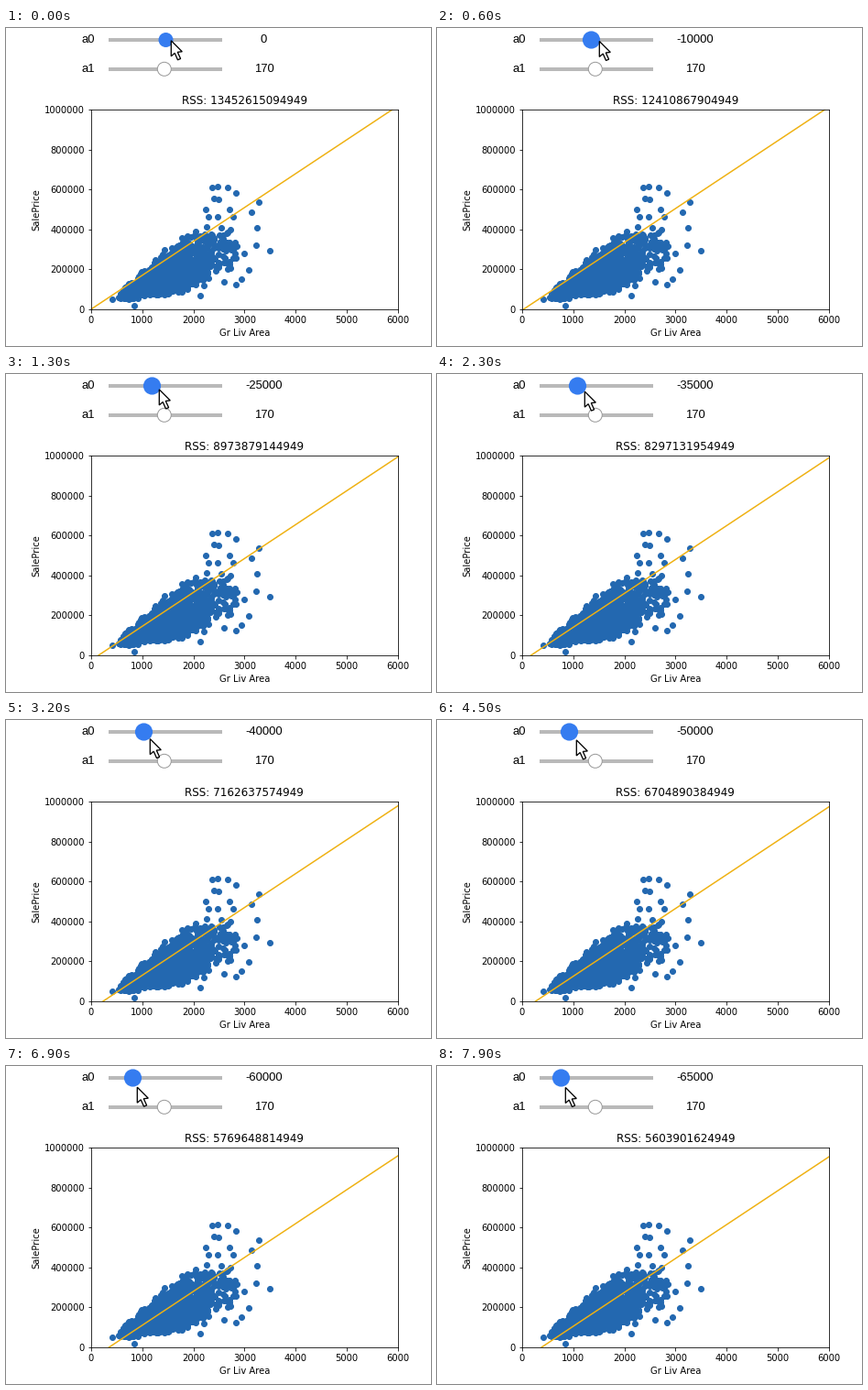
Animation of 464x347 px, one loop 8 s. Source, as a matplotlib script:

```python
import numpy as np
import matplotlib.pyplot as plt
from matplotlib.animation import FuncAnimation
from matplotlib.patches import Circle, Polygon

W, H, DPI = 464, 347, 72
STEP, FRAMES = 100, 80
SLOPE, DROP = 170, 5000
BLUE, GOLD, GREY = "#2368b0", "#efb112", "#b9b9b9"

plt.rcParams["font.family"] = "DejaVu Sans"

# Ticks (100 ms) at which the intercept falls by DROP. The chart may lag by one.
SLIDER_DROPS = np.array([5, 6, 8, 10, 13, 20, 23, 32, 36, 45, 57, 69, 76])
LAGGING = ~np.isin(SLIDER_DROPS, [13, 32, 36, 57, 69])
CHART_DROPS = SLIDER_DROPS + LAGGING


def intercept(drops, tick):
    return -DROP * int(np.sum(drops <= tick))


def rss(a0):
    return 13452615094949 + 215649438 * a0 + 1460 * a0 ** 2


def pointer_tip(tick):
    x = np.interp(tick, [4, 13, 15, 32, 45, 59, 79],
                  [180.3, 167.3, 165.3, 157.3, 152.3, 147.3, 140.3])
    x = np.floor(x) + 0.3
    return x, np.interp(x, [140, 150, 157, 167, 180], [23.5, 22.5, 20.7, 17, 13.8])


def houses():
    """Dense fan of sales, a thin tail of large houses, and isolated sales."""
    rng = np.random.default_rng(4)
    area = rng.lognormal(np.log(1464), 0.31, 1430)
    area = area[(area > 480) & (area < 2350)]
    low = 20e3 + 35 * area + 100 * np.clip(area - 2050, 0, None)
    high = np.minimum(225 * area - 18e3, 415e3)
    price = low + (high - low) * rng.beta(2.1, 2.9, area.size)

    tail_area = rng.uniform(2200, 2850, 75)
    tail_price = np.clip(rng.normal(295e3, 85e3, 75), 125e3, 465e3)

    lone_area, lone_price = np.array([
        (2360, 610), (2467, 616), (2664, 611), (2825, 582), (3283, 536),
        (3130, 487), (3238, 409), (3220, 320), (3489, 294), (3077, 196),
        (2933, 152), (2996, 278), (2395, 556), (2485, 552), (2233, 501),
        (2700, 501), (2135, 66), (834, 16), (413, 48)]).T
    return (np.r_[area, tail_area, lone_area],
            np.r_[price, tail_price, lone_price * 1e3])


fig = plt.figure(figsize=(W / DPI, H / DPI), dpi=DPI, facecolor="white")

# Chart
ax = fig.add_axes([93 / W, 40.2 / H, 334.8 / W, 217.44 / H])
ax.plot(*houses(), "o", color=BLUE, ms=6, mew=1)
fit_x = np.array([0, 7000])
fit, = ax.plot(fit_x, SLOPE * fit_x, color=GOLD, lw=1.5)
ax.set(xlim=(0, 6000), ylim=(0, 1e6), xlabel="Gr Liv Area", ylabel="SalePrice")
ax.ticklabel_format(style="plain", axis="y")
title = ax.set_title("", fontsize=12)

# Controls, in pixels from the top left
ui = fig.add_axes([0, 0, 1, 1], facecolor="none")
ui.set(xlim=(0, W), ylim=(H, 0))
ui.axis("off")


def slider(name, y):
    ui.plot([112, 236], [y + 0.2] * 2, color=GREY, lw=4, solid_capstyle="butt")
    font = dict(family="Liberation Sans", size=13, color="black")
    ui.text(82.6, y + 3.6, name, **font)
    return ui.text(281.5, y + 3.6, str(SLOPE), ha="center", **font)


value = slider("a0", 12.8)
slider("a1", 44.6)
knob = ui.add_patch(Circle((174.6, 13), 8, fc="#357cf0", ec="none", zorder=3))
ui.add_patch(Circle((172.8, 44.8), 7.5, fc="white", ec="#999999", lw=1, zorder=3))

ARROW = np.array([(0, 0), (0, 17), (3.9, 13.6), (7.2, 21), (10.3, 19.7),
                  (7, 12.5), (12, 12)])
pointer = ui.add_patch(Polygon(ARROW, fc="white", ec="black", lw=1.3, zorder=4))


def update(tick):
    a0 = intercept(SLIDER_DROPS, tick)
    value.set_text(str(a0))
    knob.center = (174.5 + 0.0006 * a0, 13)
    knob.set_radius(9.6 if tick >= SLIDER_DROPS[0] else 8)

    drawn = intercept(CHART_DROPS, tick)
    fit.set_ydata(drawn + SLOPE * fit_x)
    title.set_text(f"RSS: {rss(drawn)}")

    pointer.set_xy(ARROW + pointer_tip(tick))
    return value, knob, fit, title, pointer


anim = FuncAnimation(fig, update, frames=FRAMES, interval=STEP, repeat=True,
                     repeat_delay=0, blit=False)
plt.show()
```
